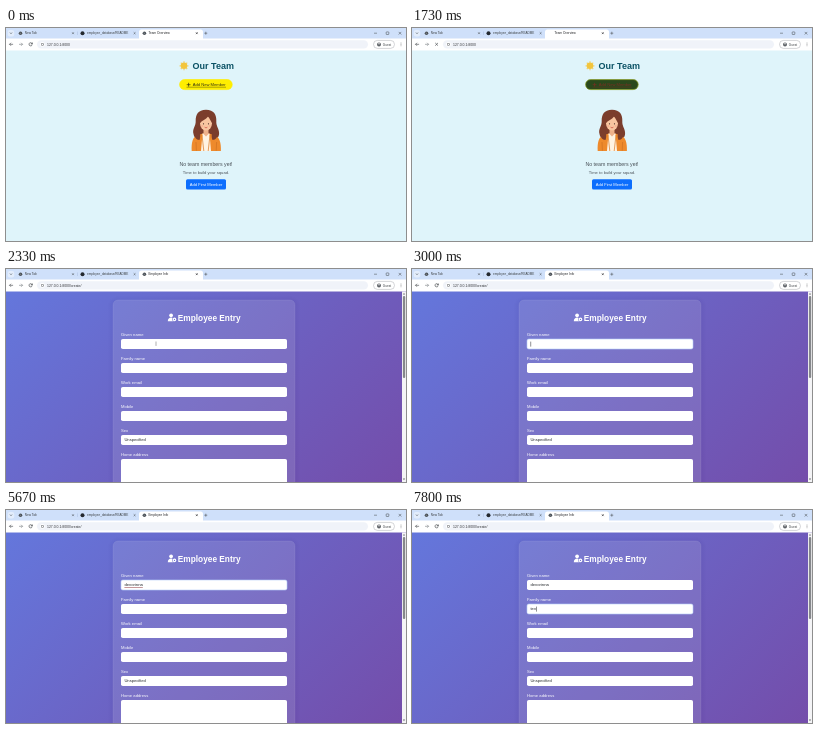
These frames come from a looping animation (400x213 px, 8 s). An HTML page with a canvas:

```html
<!DOCTYPE html>
<html lang="en">
<head>
<meta charset="utf-8">
<title>Team form</title>
<style>
html, body { margin: 0; width: 100%; height: 100%; overflow: hidden; }
canvas { display: block; width: 400px; height: 213px; }
</style>
</head>
<body>
<canvas id="stage"></canvas>
<script>
const W = 400, H = 213, LOOP = 8000;
const SANS = '"Liberation Sans", Arial, sans-serif';
const canvas = document.getElementById('stage');
const ctx = canvas.getContext('2d');
const dpr = window.devicePixelRatio || 1;
canvas.width = W * dpr;
canvas.height = H * dpr;

const OPEN_FORM = 1800;
const given = { text: 'devorinna', keys: [3530, 3870, 4070, 4270, 4400, 4470, 4730, 4870, 5130], focus: 2730, blur: 6730 };
const family = { text: 'tev', keys: [7530, 7600, 7800], focus: 6730, blur: LOOP };

const clamp = v => Math.max(0, Math.min(1, v));
const mix = (a, b, k) => a + (b - a) * k;
const mixRgb = (a, b, k) => `rgb(${a.map((v, i) => Math.round(mix(v, b[i], k)))})`;
const ease = k => k * k * (3 - 2 * k);

function rect(x, y, w, h, color) {
  ctx.fillStyle = color;
  ctx.fillRect(x, y, w, h);
}

function pill(x, y, w, h, r, fill, stroke, lw = 0.5) {
  ctx.beginPath();
  ctx.roundRect(x, y, w, h, r);
  if (fill) { ctx.fillStyle = fill; ctx.fill(); }
  if (stroke) { ctx.strokeStyle = stroke; ctx.lineWidth = lw; ctx.stroke(); }
}

function dot(x, y, r, color, ry = r) {
  ctx.beginPath();
  ctx.ellipse(x, y, r, ry, 0, 0, Math.PI * 2);
  ctx.fillStyle = color;
  ctx.fill();
}

function line(points, color, lw = 0.6) {
  ctx.beginPath();
  points.forEach(([x, y], i) => i ? ctx.lineTo(x, y) : ctx.moveTo(x, y));
  ctx.strokeStyle = color;
  ctx.lineWidth = lw;
  ctx.stroke();
}

function shape(path, color) {
  ctx.fillStyle = color;
  ctx.fill(new Path2D(path));
}

function text(str, x, y, size, color, { bold = false, align = 'left' } = {}) {
  ctx.font = `${bold ? 'bold ' : ''}${size}px ${SANS}`;
  ctx.textAlign = align;
  ctx.fillStyle = color;
  ctx.fillText(str, x, y);
}

function cross(x, y, r, color, lw) {
  line([[x - r, y - r], [x + r, y + r]], color, lw);
  line([[x + r, y - r], [x - r, y + r]], color, lw);
}

function arrow(x, y, dir, color) {
  line([[x - 1.8, y], [x + 1.8, y]], color);
  line([[x + dir * 0.3, y - 1.5], [x + dir * 1.8, y], [x + dir * 0.3, y + 1.5]], color);
}

function globe(x, y) {
  dot(x, y, 1.8, '#4d5359');
  line([[x - 1, y - 0.5], [x + 0.5, y + 0.5]], '#a9b0b8', 0.5);
}

function browser(t) {
  const onForm = t >= OPEN_FORM;
  const loading = t >= 1730 && t < OPEN_FORM;
  const ink = '#3c4043';
  rect(0, 0, W, 22.5, '#fff');
  rect(0, 0, W, 10.5, '#cfe0fa');
  pill(1.8, 2, 6.4, 6.4, 2, '#e3edfc');
  line([[4, 4.6], [5, 5.7], [6, 4.6]], ink);

  globe(14.5, 5.2);
  text('New Tab', 18.7, 6.4, 3.1, ink);
  dot(76.5, 5.2, 2, '#24292f');
  text('employee_database/README', 81, 6.4, 3.05, ink);
  cross(67, 5.2, 0.9, ink, 0.5);
  cross(128.6, 5.2, 0.9, ink, 0.5);
  line([[71.5, 3.5], [71.5, 7]], '#9fb4d6', 0.4);

  pill(133, 1.5, 64, 10, [2.5, 2.5, 0, 0], '#fff');
  if (!loading) globe(138.4, 5.2);
  text(onForm ? 'Employee Info' : 'Team Overview', 142.5, 6.4, 3.1, '#202124');
  cross(190.8, 5.2, 0.9, '#202124', 0.6);
  line([[198.3, 5.2], [201.3, 5.2]], ink, 0.5);
  line([[199.8, 3.7], [199.8, 6.7]], ink, 0.5);

  line([[368, 5.2], [371, 5.2]], ink, 0.5);
  pill(380.2, 3.9, 2.6, 2.6, 0.4, null, ink, 0.5);
  cross(394, 5.2, 1.3, ink, 0.5);

  arrow(5.3, 16.3, -1, ink);
  arrow(14.8, 16.3, 1, '#777c82');
  if (loading) {
    cross(24.6, 16.3, 1.4, ink, 0.6);
  } else {
    ctx.beginPath();
    ctx.arc(24.6, 16.3, 1.6, 0.3, 5.6);
    ctx.strokeStyle = ink;
    ctx.lineWidth = 0.6;
    ctx.stroke();
    shape('M26.6 14.3v1.9h-1.9z', ink);
  }

  pill(31, 12.2, 331, 8.4, 4.2, '#f0f3f9');
  dot(36.4, 16.4, 2.3, '#fff');
  dot(36.4, 16.4, 1.4, '#5f6368');
  dot(36.4, 16.4, 0.9, '#fff');
  text('127.0.0.1:8000' + (onForm ? '/create/' : ''), 41, 17.6, 3.45, '#303236');
  pill(367.5, 12.4, 21, 8, 4, '#fff', '#a8abb0', 0.5);
  dot(373, 16.4, 2, '#5f6368');
  dot(373, 15.8, 0.7, '#fff');
  text('Guest', 376.8, 17.5, 3.1, ink);
  for (let i = -1; i < 2; i++) dot(395, 16.4 + i * 1.4, 0.4, ink);
}

function sun(x, y) {
  for (let i = 0; i < 8; i++) {
    const a = i * Math.PI / 4;
    const c = Math.cos(a), s = Math.sin(a);
    line([[x + c * 3, y + s * 3], [x + c * 4.5, y + s * 4.5]], '#efd477', 1.3);
  }
  dot(x, y, 3.3, '#f2c53d');
}

function woman() {
  const hair = '#7b3d2c', skin = '#f8c5a0', coat = '#ee8a2c';
  shape('M200 81.8C192 81.8 189.5 87 189.7 93C190 98 186 101 187.5 106C188 110 191 111 193 111H208C212 111 213.5 108 213 104C212.6 100 210 98 210.3 93C210.6 87 208 81.8 200 81.8Z', hair);
  shape('M185.7 123C185.3 115 186.5 108.5 192 107L197 105.5H203L208 107C213.5 108.5 215.3 115 214.9 123Z', coat);
  shape('M196.5 105.5H203.5L205 123H195Z', '#fff3e2');
  shape('M197.5 100H202.5V106L200 108.5L197.5 106Z', '#eeb18a');
  dot(200, 95.3, 6, skin, 7.2);
  shape('M193.4 96C193 88 196 85.5 200 85.5C204.5 85.5 207 89 206.6 96C205 93.5 203.5 90 202 88.5C200 91.5 196 92 193.4 96Z', hair);
  shape('M193.5 98C193 104 195.5 107 193.5 112C190 112 188 109 189 105Z', hair);
  shape('M206.5 98C207 104 204.5 107 206.5 112C210 112 212 109 211 105Z', hair);
  dot(197.5, 95.8, 0.6, '#3b2320');
  dot(202.5, 95.8, 0.6, '#3b2320');
  dot(196.2, 98, 1, '#f3a78c', 0.7);
  dot(203.8, 98, 1, '#f3a78c', 0.7);
  line([[198.6, 99.2], [200, 99.9], [201.4, 99.2]], '#c9483d', 0.7);
  line([[190, 114], [190.4, 122.8]], '#c96e20', 0.6);
  line([[210.6, 114], [210.2, 122.8]], '#c96e20', 0.6);
  line([[196, 107], [197.8, 123]], '#d87822', 0.7);
  line([[204, 107], [202.2, 123]], '#d87822', 0.7);
}

function teamPage(t) {
  rect(0, 22, W, H - 22, '#dff4fa');
  sun(178, 37.8);
  text('Our Team', 186.6, 41.2, 9, '#0b5265', { bold: true });

  const k = ease(clamp((t - 470) / 800));
  const ink = mixRgb([45, 45, 20], [125, 45, 35], k);
  pill(173.6, 51.6, 52.6, 10, 5, mixRgb([255, 238, 0], [42, 72, 28], k), mixRgb([255, 238, 0], [135, 155, 25], k), 0.7);
  line([[180.7, 56.7], [184.5, 56.7]], ink, 0.7);
  line([[182.6, 54.8], [182.6, 58.6]], ink, 0.7);
  text('Add New Member', 186.8, 58.1, 4.12, ink);
  line([[180.5, 59.2], [220, 59.2]], ink, 0.4);

  woman();
  text('No team members yet!', 200, 137.5, 5.25, '#495057', { align: 'center' });
  text('Time to build your squad.', 200, 145.6, 4.15, '#495057', { align: 'center' });
  pill(180, 151.2, 40, 10.2, 1.5, '#0d6efd');
  text('Add First Member', 200, 157.8, 4.1, '#fff', { align: 'center' });
}

function typed(field, y, t) {
  const keys = field.keys.filter(k => k <= t);
  const str = field.text.slice(0, keys.length);
  const size = 4.2, x = 118.4;
  text(str, x, y + 6.4, size, '#212529');
  const end = x + ctx.measureText(str).width;
  if (t < field.focus || t >= field.blur) return;

  pill(115, y, 166, 10, 1.8, null, '#b5cdf8', 0.6);
  if (t >= 5670 && field === given) line([[x, y + 7.5], [end, y + 7.5]], '#8a3038', 0.5);
  const since = t - (keys.length ? keys[keys.length - 1] : field.focus);
  if (since % 1060 < 535) rect(end + 0.2, y + 2.6, 0.5, 5, '#212529');
}

function userIcon(x, y) {
  dot(x - 0.9, y - 2, 1.9, '#fff');
  shape(`M${x - 4.2} ${y + 4}c0-5 6.5-5 6.5 0z`, '#fff');
  dot(x + 2.5, y + 2.1, 2.3, '#7677d0');
  dot(x + 2.5, y + 2.1, 1.8, '#fff');
  dot(x + 2.5, y + 2.1, 0.6, '#7677d0');
}

function pointer(t) {
  if (t >= 2730) return;
  const k = ease(clamp((t - 2070) / 260));
  const x = mix(205, 150, k), y = mix(57.3, 72.5, k);
  if (k < 1) {
    shape(`M${x} ${y}v3.4l.8-.7.6 1.3.6-.3-.6-1.2h1.1z`, '#fff');
  } else {
    line([[x, y], [x, y + 4.4]], '#333', 0.4);
  }
}

function formPage(t) {
  const half = (W + H - 22) / 4;
  const bg = ctx.createLinearGradient(198 - half, 117 - half, 198 + half, 117 + half);
  bg.addColorStop(0, '#6477dc');
  bg.addColorStop(1, '#744daa');
  rect(0, 22, W, H - 22, bg);

  ctx.save();
  ctx.beginPath();
  ctx.rect(0, 22, 396, H);
  ctx.clip();
  for (let i = 5; i > 0; i--) {
    pill(107 - i, 32 - i, 182 + i * 2, 200, 5 + i, 'rgba(35,25,95,0.013)');
  }
  pill(107, 31, 182, 200, 5, 'rgba(255,255,255,0.13)', 'rgba(255,255,255,0.16)', 0.5);
  ctx.restore();

  userIcon(166, 48.3);
  text('Employee Entry', 171.8, 51.6, 8.3, '#fff', { bold: true });
  ['Given name', 'Family name', 'Work email', 'Mobile', 'Sex', 'Home address'].forEach((label, i) => {
    const y = 70 + i * 24;
    text(label, 115, y - 3.4, 4.2, '#fff');
    pill(115, y, 166, i === 5 ? 40 : 10, 1.8, '#fff');
  });
  text('Unspecified', 118.4, 172.4, 4.1, '#212529');
  typed(given, 70, t);
  typed(family, 94, t);

  rect(396, 22.5, 4, H, '#f4f4f6');
  pill(396.9, 27, 2.3, 82, 1.1, '#85878b');
  shape('M396.9 25.6h2.2l-1.1-1.6z', '#6a6c70');
  shape('M396.9 209.6h2.2l-1.1 1.6z', '#6a6c70');
  pointer(t);
}

function draw(now) {
  const t = now % LOOP;
  ctx.setTransform(dpr, 0, 0, dpr, 0, 0);
  if (t < OPEN_FORM) teamPage(t);
  else formPage(t);
  browser(t);
}

const start = performance.now();
function tick() {
  draw(performance.now() - start);
  requestAnimationFrame(tick);
}
tick();
</script>
</body>
</html>
```
